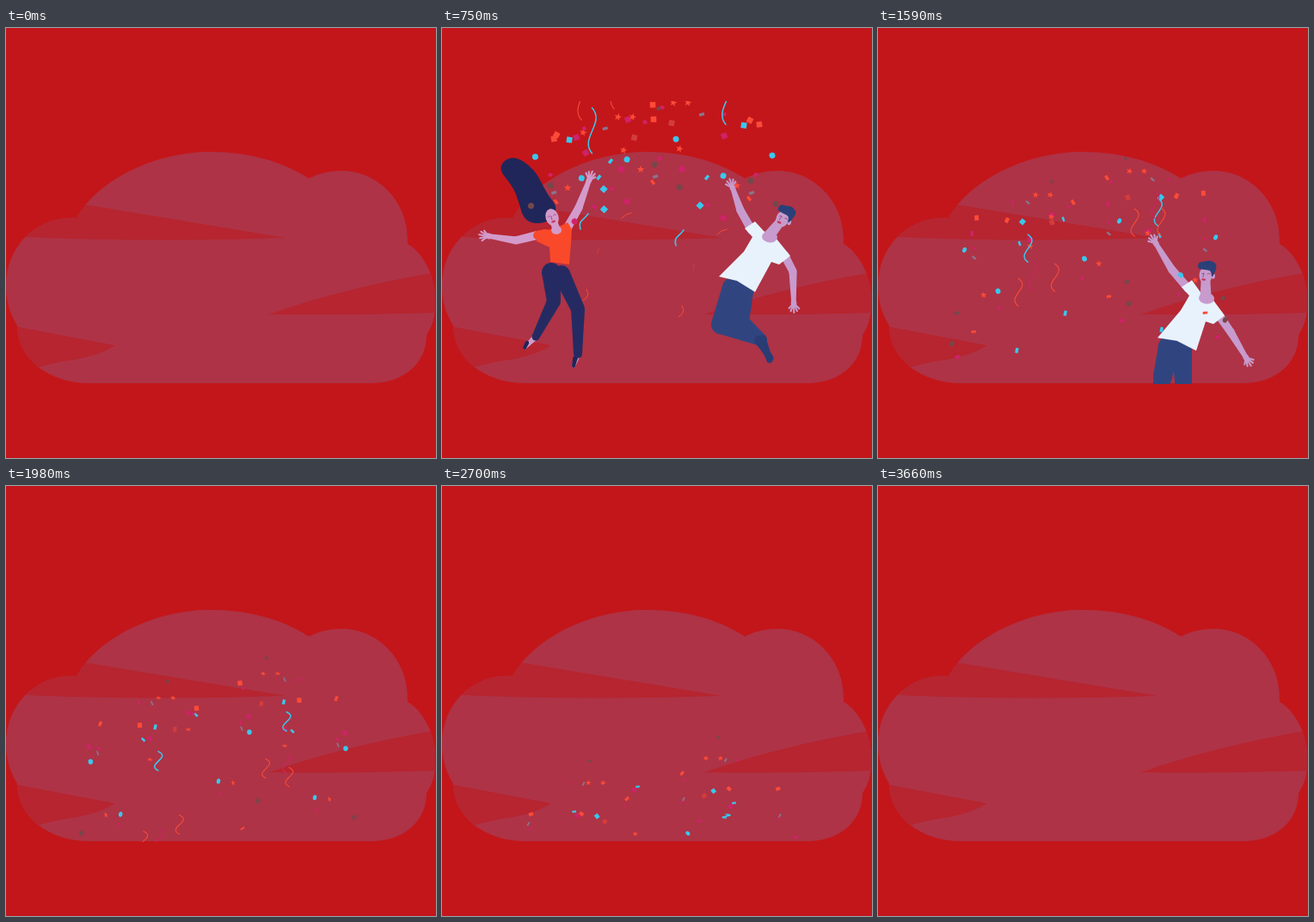
Animation, 500 px wide and 500 px high, one loop 3840 ms. Source, as an HTML page with a canvas:

```html
<!DOCTYPE html>
<html>
<head>
<meta charset="utf-8">
<style>
  html, body { margin: 0; width: 100%; height: 100%; overflow: hidden; background: #c3161a; }
  canvas { display: block; width: 500px; height: 500px; }
</style>
</head>
<body>
<canvas id="stage" width="500" height="500"></canvas>
<script>
const g = document.getElementById('stage').getContext('2d');
const LOOP = 3840;
const ORANGE = '#fb4a38', BLUE = '#38c8ee', PINK = '#d0226a', BROWN = '#75484a', SLATE = '#86768f', DIM = '#d23c3d';

const cloud = new Path2D('M97 413H427C465 412 489 388 489 357C497 345 499 335 499 318C500 290 486 262 467 251C469 200 430 166 391 166C377 166 364 169 352 175C322 155 281 144 238 144C175 144 108 175 82 221C40 217 0 250 0 300C0 318 5 333 13 346C13 385 50 413 97 413Z');
const bands = new Path2D('M60 200L325 244Q160 250 0 242V200ZM305 333Q390 303 500 284V331Q420 334 305 333ZM0 345L127 369Q107 382 70 387Q50 390 30 397L0 402Z');

const lerp = (a, b, u) => a + (b - a) * u;
const clamp = u => Math.max(0, Math.min(1, u));
const smooth = u => u * u * (3 - 2 * u);

function line(color, width, draw) {
  g.strokeStyle = color;
  g.lineWidth = width;
  g.beginPath();
  draw();
  g.stroke();
}

function disc(x, y, rx, ry, color, angle = 0) {
  g.fillStyle = color;
  g.beginPath();
  g.ellipse(x, y, rx, ry, angle, 0, 7);
  g.fill();
}

function poly(points, color) {
  g.fillStyle = color;
  g.beginPath();
  points.forEach(p => g.lineTo(...p));
  g.fill();
}

// Closed curve through the midpoints of the given corners
function blob(points, color) {
  const n = points.length, mid = (a, b) => [(a[0] + b[0]) / 2, (a[1] + b[1]) / 2];
  g.fillStyle = color;
  g.beginPath();
  g.moveTo(...mid(points[n - 1], points[0]));
  points.forEach((p, i) => g.quadraticCurveTo(...p, ...mid(p, points[(i + 1) % n])));
  g.fill();
}

// Chain of tapered segments with round joints
function limb(color, points, radii) {
  points.forEach((p, i) => {
    disc(...p, radii[i], radii[i], color);
    if (!i) return;
    const q = points[i - 1], a = Math.atan2(p[1] - q[1], p[0] - q[0]) + Math.PI / 2;
    const side = (o, r) => [o[0] + Math.cos(a) * r, o[1] + Math.sin(a) * r];
    poly([side(q, radii[i - 1]), side(p, radii[i]), side(p, -radii[i]), side(q, -radii[i - 1])], color);
  });
}

function arm(shoulder, elbow, hand, skin) {
  limb(skin, [shoulder, elbow, hand], [5, 4.6, 2.7]);
  const a = Math.atan2(hand[1] - elbow[1], hand[0] - elbow[0]);
  disc(...hand, 4, 3.4, skin, a);
  for (let i = -2; i <= 2; i++) {
    const b = a + i * 0.38, r = i === 2 ? 8 : 11 - Math.abs(i);
    line(skin, 2.1, () => {
      g.moveTo(...hand);
      g.lineTo(hand[0] + Math.cos(b) * r, hand[1] + Math.sin(b) * r);
    });
  }
}

function face(head, tilt, skin, look) {
  g.save();
  g.translate(...head);
  g.rotate(tilt);
  disc(0, 0, 7.5, 10, skin);
  line('#9c4f86', 0.9, () => {
    for (const x of [-4.5, 2]) {
      g.moveTo(x, -1.5);
      g.quadraticCurveTo(x + 1.5, -3, x + 3, -1.5);
    }
    g.moveTo(-0.5 + look, -1);
    g.lineTo(-1 + look, 2.5);
  });
  disc(look, 5.3, 2.6, 1.3, '#c8385c');
  g.restore();
}

// Poses are interpolated without the jump, which is added back afterwards
function pose(keys, times, t, jump) {
  let k = 0;
  while (k < times.length - 2 && t > times[k + 1]) k++;
  const u = smooth(clamp((t - times[k]) / (times[k + 1] - times[k])));
  return keys[k].map((p, i) => {
    const q = keys[k + 1][i];
    return [lerp(p[0], q[0], u), lerp(p[1] - jump(times[k]), q[1] - jump(times[k + 1]), u) + jump(t)];
  });
}

// head, neck, left arm, right arm, waist, left leg, right leg
const herPoses = [
  [[128, 220], [133, 234], [111, 241], [86, 247], [54, 242], [146, 232], [159, 209], [171, 177],
   [126, 272], [148, 275], [127, 284], [130, 318], [109, 359], [96, 372], [139, 286], [158, 327], [158, 379], [153, 393]],
  [[131, 285], [135, 303], [114, 311], [92, 322], [57, 329], [146, 297], [164, 270], [179, 242],
   [124, 339], [149, 341], [127, 350], [132, 380], [110, 414], [100, 430], [139, 353], [160, 389], [143, 414], [140, 430]]
];
const herHair = [
  [[136, 210], [122, 193], [108, 164], [82, 147], [64, 162], [82, 184], [88, 198], [96, 226], [122, 228]],
  [[144, 283], [150, 264], [127, 244], [120, 217], [96, 216], [89, 240], [103, 262], [106, 284], [123, 294]]
];
const hisPoses = [
  [[396, 222], [380, 242], [360, 235], [347, 212], [338, 186], [398, 264], [408, 283], [409, 320],
   [322, 289], [364, 307], [338, 302], [324, 345], [368, 363], [382, 384], [350, 306], [347, 342], [372, 362], [381, 386]],
  [[390, 227], [383, 250], [362, 239], [352, 213], [349, 178], [399, 270], [418, 287], [435, 309],
   [321, 291], [363, 311], [334, 303], [320, 346], [386, 360], [401, 379], [350, 308], [347, 346], [343, 370], [342, 385]],
  [[381, 287], [381, 313], [361, 303], [342, 281], [323, 250], [396, 333], [410, 353], [428, 383],
   [325, 360], [370, 375], [338, 370], [331, 405], [326, 438], [325, 460], [353, 372], [355, 410], [352, 440], [350, 460]]
];
const herJump = t => 4.5e-4 * (t - 800) ** 2;
const hisJump = t => 80 * (Math.abs(t - 940) / 650) ** 2.48 * (t < 940 ? 1.5 : 1);

function woman(t) {
  const skin = '#d39bcb', times = [750, 1200], u = smooth(clamp((t - 750) / 450));
  const [head, neck, s1, e1, h1, s2, e2, h2, w1, w2, a, ak, af, at, b, bk, bf, bt] = pose(herPoses, times, t, herJump);
  const top = `rgb(${lerp(250, 207, u)},${lerp(73, 70, u)},${lerp(42, 106, u)})`, trousers = '#252b62';
  const hair = pose(herHair, times, t, herJump);
  blob(hair, '#20265a');
  line('#20265a', 1, () => {
    g.moveTo(...hair[5]);
    g.quadraticCurveTo(...hair[6], hair[8][0] - 8, hair[8][1] - 2);
  });
  limb(skin, [af, at], [3.5, 2]);
  limb(skin, [bf, bt], [3.5, 2]);
  limb('#20265a', [at, [at[0] + 3, at[1] - 6]], [2, 2.2]);
  limb('#20265a', [bt, [bt[0] + 2, bt[1] - 9]], [2, 2.7]);
  limb(trousers, [b, bk, bf], [10, 8, 5]);
  limb(trousers, [a, ak, af], [11, 8, 4.5]);
  arm(s1, e1, h1, skin);
  arm(s2, e2, h2, skin);
  poly([[s1[0] - 2, s1[1] - 5], [neck[0] - 5, neck[1]], [neck[0] + 5, neck[1] - 4], [s2[0], s2[1] - 6],
    [s2[0] + 5, s2[1] + 2], [w2[0] + 2, w2[1] - 25], w2, w1, [w1[0] - 1, w1[1] - 17], [s1[0] - 1, s1[1] + 7]], top);
  limb(top, [s1, [s1[0] + 9, s1[1] - 1]], [5, 6]);
  limb(skin, [neck, head], [4.5, 4]);
  disc(neck[0], neck[1] + 1, 6, 5, skin);
  face(head, lerp(-0.3, -0.05, u), skin, 0);
}

function man(t) {
  const skin = '#c79bcd', trousers = '#304580', shirt = '#e8f2fd';
  const [head, neck, s1, e1, h1, s2, e2, h2, w1, w2, a, ak, af, at, b, bk, bf, bt] = pose(hisPoses, [750, 1200, 1590], t, hisJump);
  limb(trousers, [b, bk, bf], [12, 10, 6]);
  limb('#2a3c74', [bf, bt], [5, 3.5]);
  limb(trousers, [a, ak, af], [12, 11, 6]);
  limb('#2a3c74', [af, at], [5, 3.5]);
  arm(s1, e1, h1, skin);
  arm(s2, e2, h2, skin);
  poly([[s1[0] - 8, s1[1] - 2], [s1[0] + 4, s1[1] - 10], [neck[0] - 6, neck[1] - 6], [neck[0] + 8, neck[1] + 2],
    [s2[0] + 7, s2[1] + 1], [s2[0] - 6, s2[1] + 11], [s2[0] - 15, s2[1] + 8], w2, [(w1[0] + w2[0]) / 2, (w1[1] + w2[1]) / 2 - 4],
    w1, [s1[0] - 9, s1[1] + 25], [s1[0] + 1, s1[1] + 8]], shirt);
  limb(skin, [neck, head], [6.5, 5]);
  disc(neck[0] + 1, neck[1] + 1, 9, 6.5, skin, 0.1);
  const tilt = lerp(0.4, 0.06, clamp((t - 750) / 600));
  face(head, tilt, skin, -2);
  g.save();
  g.translate(...head);
  g.rotate(tilt);
  disc(9, 1, 2, 3, skin);
  blob([[-10, -7], [-9, -15], [-3, -15], [4, -18], [13, -13], [10, -2], [7, 3], [6, -6], [-2, -6]], '#2b4079');
  g.restore();
}

// kind, colour, resting x and y at 1980 ms, sideways drift, terminal speed
const burst = [
  ['bar', BLUE, 221, 266, 25, .117], ['square', PINK, 212, 264, 45, .125], ['star', ORANGE, 212, 283, 48, .17],
  ['bar', SLATE, 274, 282, 26, .115], ['square', PINK, 282, 268, 66, .17], ['dot', PINK, 273, 275, 20, .13],
  ['disc', BLUE, 283, 286, 11, .165], ['disc', BLUE, 247, 343, 32, .2], ['star', ORANGE, 264, 345, 33, .19],
  ['bar', PINK, 249, 358, 52, .18], ['disc', BROWN, 293, 366, 17, .19], ['square', BLUE, 226, 425, 38, .25],
  ['disc', PINK, 302, 430, 87, .24], ['disc', BROWN, 304, 425, 57, .28], ['bar', ORANGE, 275, 398, 30, .23]
];
const shower = [
  ['dot', BROWN, 303, 200, 70, .129], ['star', ORANGE, 299, 218, 30, .138], ['star', ORANGE, 316, 218, 30, .138],
  ['bar', SLATE, 324, 225, 22, .131], ['dot', PINK, 340, 225, 12, .131], ['square', ORANGE, 272, 229, 27, .147],
  ['square', ORANGE, 341, 249, -28, .144], ['square', DIM, 297, 253, 30, .15], ['square', BLUE, 323, 251, -28, .145],
  ['square', ORANGE, 384, 247, 26, .147], ['dot', PINK, 276, 235, 20, .15]
];

// Fall with air drag, the apex being at 700 ms
const fall = t => t - 1980 + 333 * (Math.exp(-.003 * (t - 700)) - .0215);
const drift = t => (Math.exp(-.0008 * (t - 750)) - .374) / .626;

function shape(kind, color) {
  g.fillStyle = color;
  if (kind === 'bar') g.fillRect(-3, -1.7, 6, 3.4);
  else if (kind === 'square') g.fillRect(-3.3, -3.3, 6.6, 6.6);
  else if (kind === 'disc') disc(0, 0, 3.5, 3.5, color);
  else if (kind === 'dot') disc(0, 0, 2.6, 2.2, color);
  else poly(Array.from({ length: 10 }, (_, i) => {
    const r = i % 2 ? 1.9 : 4.6, a = i * Math.PI / 5 - Math.PI / 2;
    return [r * Math.cos(a), r * Math.sin(a)];
  }), color);
}

function confetti(list, originX, t, dx, dy, mirror, lead) {
  if (t < 180) return;
  const open = 1 - (1 - clamp((t - 180) / 420)) ** 3, time = Math.max(t, 450) + lead;
  list.forEach(([kind, color, x0, y0, d, v], i) => {
    const x = lerp(originX, x0 - d * drift(time), open), y = lerp(300, y0 + v * fall(time), open);
    const spin = i * 1.7 + t * .0012 * (i % 2 ? 1 : -1), size = open * (1 - Math.max(0, t - 750) * .00011);
    const flip = 1 - clamp((t - 750) / 900) * (.25 + .2 * Math.sin(i + t * .006));
    g.save();
    g.translate(mirror ? dx - x : dx + x, y + dy);
    g.rotate(kind === 'star' ? spin * .1 : spin);
    g.scale(size, size * flip);
    shape(kind, color);
    g.restore();
  });
}

// colour, x and y at 1590 ms, speed
const streamers = [
  [BLUE, 174, 256, .163], [PINK, 177, 288, .31], [ORANGE, 203, 290, .265], [ORANGE, 163, 307, .27],
  [BLUE, 328, 214, .153], [PINK, 325, 205, .3], [ORANGE, 299, 226, .262], [ORANGE, 327, 225, .29]
];

function ribbons(t) {
  streamers.forEach(([color, x, y, v], i) => {
    const h = 32 - .025 * (t - 1590), blue = color === BLUE;
    if (t < 450 || h < 3) return;
    g.save();
    g.translate(x + 3 * Math.sin(t * .004 + i), y + v * (t - 1590));
    line(color, blue ? 1.5 : 1.1, () => {
      g.moveTo(0, -h / 2);
      g.bezierCurveTo(16, -h / 6, -15, h / 6, 0, h / 2);
    });
    g.restore();
  });
  if (t < 480 || t > 960) return;
  for (const [dx, dy] of [[0, 0], [111, 19]]) {
    g.save();
    g.translate(dx, dy + (750 - t) * .1);
    g.globalAlpha = clamp((960 - t) / 210);
    line(BLUE, 1.6, () => { g.moveTo(161, 234); g.bezierCurveTo(158, 223, 165, 224, 170, 216); });
    line(ORANGE, 1, () => {
      g.moveTo(209, 221); g.quadraticCurveTo(214, 216, 220, 215);
      g.moveTo(168, 304); g.quadraticCurveTo(173, 312, 164, 317);
    });
    line(DIM, 1, () => { g.moveTo(182, 256); g.lineTo(181, 263); });
    g.restore();
  }
}

function render(t) {
  g.fillStyle = '#c3161a';
  g.fillRect(0, 0, 500, 500);
  g.fillStyle = '#ae3346';
  g.fill(cloud);
  g.save();
  g.clip(cloud);
  g.fillStyle = '#b62530';
  g.fill(bands);
  g.restore();
  if (t < 60 || t >= 3660) return;
  g.save();
  g.beginPath();
  g.rect(0, 85, 500, 329);
  g.clip();
  g.lineCap = g.lineJoin = 'round';
  if (t < 1650) woman(t);
  if (t < 2010) man(t);
  confetti(burst, 210, t, 0, 0, false, 0);
  confetti(burst, 210, t, 112, 19, false, 0);
  confetti(burst, 210, t, 382, 15, true, 120);
  confetti(shower, 325, t, 0, 0, false, 0);
  confetti(shower, 325, t, 495, 12, true, 120);
  ribbons(t);
  g.restore();
}

function tick() {
  render(performance.now() % LOOP);
  requestAnimationFrame(tick);
}
tick();
</script>
</body>
</html>
```
